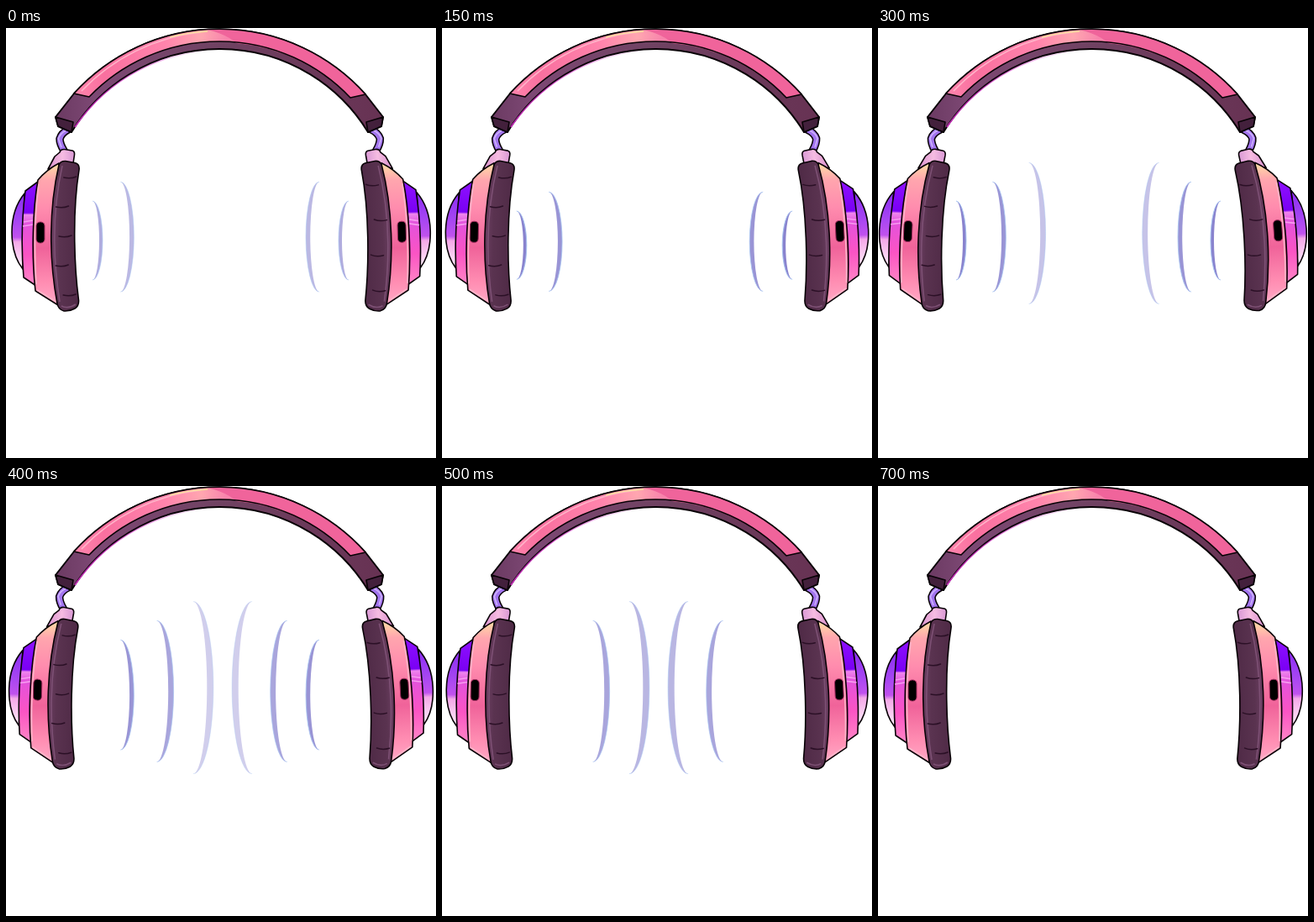
An HTML page that plays this animation: 512x512 px, repeating every 1.1 s.

```html
<!DOCTYPE html>
<html lang="en">
<head>
<meta charset="utf-8">
<title>Headphones</title>
<style>
  html, body { margin: 0; width: 100%; height: 100%; overflow: hidden; background: #fff; }
  svg { display: block; width: 100vw; height: 100vh; }
  .line { fill: none; stroke: #080206; stroke-width: 1.6; stroke-linejoin: round; stroke-linecap: round; }
  .shine { fill: none; stroke-width: 1.6; }
  .tick { fill: none; stroke: #2b1026; stroke-width: 1.5; stroke-linecap: round; }
</style>
</head>
<body>
<svg viewBox="0 0 512 512">
  <defs>
    <linearGradient id="band" gradientUnits="userSpaceOnUse" x1="81" y1="0" x2="262" y2="0">
      <stop offset="0" stop-color="#ff86ae"/><stop offset=".2" stop-color="#f9709f"/>
      <stop offset=".6" stop-color="#ff84ac"/><stop offset=".84" stop-color="#ffa6b0"/>
      <stop offset="1" stop-color="#f884ac"/>
    </linearGradient>
    <linearGradient id="under" gradientUnits="userSpaceOnUse" x1="59" y1="0" x2="449" y2="0">
      <stop offset="0" stop-color="#6b3a62"/><stop offset=".12" stop-color="#7d4874"/>
      <stop offset=".5" stop-color="#704262"/><stop offset="1" stop-color="#673253"/>
    </linearGradient>
    <linearGradient id="glow" gradientUnits="userSpaceOnUse" x1="80" y1="0" x2="240" y2="0">
      <stop offset="0" stop-color="#d22cc4"/><stop offset="1" stop-color="#d22cc4" stop-opacity="0"/>
    </linearGradient>
    <linearGradient id="shell" x1="0" y1="0" x2="0" y2="1">
      <stop offset="0" stop-color="#ffe0a4"/><stop offset=".12" stop-color="#ffa6ae"/>
      <stop offset=".32" stop-color="#ff8cae"/><stop offset=".6" stop-color="#f0639a"/>
      <stop offset=".84" stop-color="#ff8db2"/><stop offset="1" stop-color="#ffa9c6"/>
    </linearGradient>
    <linearGradient id="ring" gradientUnits="userSpaceOnUse" x1="0" y1="185" x2="0" y2="306">
      <stop offset="0" stop-color="#8d10ff"/><stop offset=".29" stop-color="#7a00f4"/>
      <stop offset=".31" stop-color="#ef86ee"/><stop offset=".4" stop-color="#e352dc"/>
      <stop offset=".7" stop-color="#fb54c4"/><stop offset="1" stop-color="#ff86c6"/>
    </linearGradient>
    <linearGradient id="disc" x1="0" y1="0" x2="0" y2="1">
      <stop offset="0" stop-color="#8a2cf2"/><stop offset=".35" stop-color="#a545f2"/>
      <stop offset=".58" stop-color="#c052ee"/><stop offset=".64" stop-color="#f4a8e8"/>
      <stop offset="1" stop-color="#fff0fa"/>
    </linearGradient>
    <linearGradient id="pad" x1="0" y1="0" x2="1" y2="0">
      <stop offset="0" stop-color="#6c3f62"/><stop offset=".3" stop-color="#5a3350"/>
      <stop offset="1" stop-color="#4f2a46"/>
    </linearGradient>
    <linearGradient id="stem" x1="0" y1="0" x2="1" y2="0">
      <stop offset="0" stop-color="#d890cc"/><stop offset=".55" stop-color="#f6bce2"/>
      <stop offset="1" stop-color="#d898d4"/>
    </linearGradient>

    <g id="cup">
      <path class="line" style="stroke-width:9.500" d="M74 121Q66 125 64 132Q64 138 69 146"/>
      <path class="line" style="stroke:#a274ee;stroke-width:6.400" d="M74 121Q66 125 64 132Q64 138 69 146"/>
      <path class="shine" stroke="#cdb2fb" d="M71 122Q64 126 62.500 132L66 142"/>
      <path class="line" style="fill:url(#stem)" d="M64 148Q65 144 70 144.500L79 146Q82 147 81.500 151L80 161L50 168L58 153Z"/>

      <path class="line" style="fill:url(#disc)" d="M22 197C13 208 7 224 7 243C7 262 12 277 20 287Z"/>
      <path class="line" style="fill:url(#ring)" d="M38 183L23 194C19 225 18 262 21 297L36 307Z"/>
      <path class="shine" stroke="#f79cf0" d="M21 231L32 229M20 236L32 234"/>
      <path class="line" style="fill:url(#shell)" d="M63 161Q48 169 38 181C32 215 30 268 35 313L62 330Z"/>
      <path class="shine" stroke="#ffb4c8" d="M39 186Q32 240 36 305M37 312L60 326"/>
      <rect x="36" y="231" width="10" height="25" rx="4.500" fill="#000" stroke="#a52e62"/>
      <path class="line" style="fill:url(#pad)" d="M63 163Q65 158 71 158.500L82 160.500Q88 162 87 169C79 218 81 282 86.500 324Q87 331 82 334Q76 337.500 69 337Q62 335 61 328C51 275 51 215 63 163Z"/>
      <path class="shine" stroke="#7d5074" d="M67 164C55 218 55 270 64 326M66 331Q74 335 83 329"/>
    </g>
  </defs>

  <g id="waves"></g>
  <g id="left"><use href="#cup"/></g>
  <g transform="translate(509 0) scale(-1 1)"><g id="right"><use href="#cup"/></g></g>

  <path id="frame" class="line" style="fill:url(#under);stroke-width:2" d="M59 106L81 78A233.600 233.600 0 0 1 428 79L449 106L447 117L431 124A206.800 206.800 0 0 0 78 124L62 117Z"/>
  <path class="shine" stroke="url(#glow)" d="M82 118A207.500 207.500 0 0 1 254 27"/>
  <path class="line" style="fill:#43203c" d="M59 106L80 112L78 124L62 117ZM449 106L429 112L431 124L447 117Z"/>
  <path fill="url(#band)" d="M81 78A233.600 233.600 0 0 1 428 79L410 83A215 215 0 0 0 99 82Z"/>
  <path fill="#f0649b" d="M238 1.500A233.600 233.600 0 0 1 428 79L410 83A215 215 0 0 0 274 18Q262 7 238 1.500Z"/>
  <path class="shine" stroke="#ffb3c8" d="M90 75A230 230 0 0 1 232 5"/>
  <path class="shine" stroke="#ffdf9c" d="M195 11A230 230 0 0 1 240 4"/>
  <path class="line" d="M81 78A233.600 233.600 0 0 1 428 79L410 83A215 215 0 0 0 99 82Z"/>
</svg>
<script>
  const LOOP = 1100, STEP = 50, REST = 700, PEAK = 300;
  const NS = "http://www.w3.org/2000/svg";
  const $ = id => document.getElementById(id);
  const clamp = v => Math.max(0, Math.min(1, v));

  function add(parent, attrs) {
    const el = document.createElementNS(NS, "path");
    for (const k in attrs) el.setAttribute(k, attrs[k]);
    return parent.appendChild(el);
  }

  // cushion creases alternate between the two edges
  function crease(side, y, gap) {
    for (let i = 0; y < 325; i++, y += gap) {
      const edge = 55 + ((y - 250) / 30) ** 2;
      add($(side), { class: "tick", d: `M${edge + (i % 2 ? 3 : 8)} ${y}q8 2 15 -1` });
    }
  }
  crease("left", 178, 35);
  crease("right", 187, 42);

  function makeArc() {
    return {
      body: add($("waves"), { fill: "#837dcc" }),
      rim: add($("waves"), { fill: "none", stroke: "#a9c6f2" })
    };
  }
  const waves = Array.from({ length: 4 }, () => [makeArc(), makeArc()]);

  function drawArc({ body, rim }, x, y, h, w, dir, alpha) {
    const s = dir > 0 ? 1 : 0, thick = 4 + (w - 12) * 0.3;
    const outer = `M${x} ${y - h}A${w} ${h} 0 0 ${s} ${x} ${y + h}`;
    body.setAttribute("d", `${outer}A${w - thick} ${h} 0 0 ${1 - s} ${x} ${y - h}Z`);
    rim.setAttribute("d", outer);
    for (const el of [body, rim]) el.setAttribute("opacity", alpha);
  }

  // Waves grow toward the middle; the first two are already out at the start.
  function drawWave(i, t) {
    const dip = t < 200 ? Math.sin(Math.PI * t / 200) : 0;
    const drift = i ? 0 : 10 * clamp(1 - t / PEAK);
    const born = i < 2 ? -100 : 100 * i;
    const fade = Math.min(clamp((t - born) / 150), clamp((400 + 100 * i - t) / 100));
    const alpha = (0.95 - 0.13 * i) * fade;
    const x = 93 + 43.3 * i - 13 * dip;
    const y = 253 - 4.3 * i + 8 * dip;
    const h = 47 + 18.5 * i - 9 * dip;
    const w = 12 + 4 * i;
    const span = 516 - 5 * (3 - i) ** 2 / 3;
    drawArc(waves[i][0], x + drift, y, h, w, 1, alpha);
    drawArc(waves[i][1], span - x, y, h, w, -1, alpha);
  }

  function draw(t) {
    const swing = t < PEAK ? t / PEAK : (1 - (t - PEAK) / (REST - PEAK)) ** 1.6;
    $("left").setAttribute("transform", `rotate(${2.45 * swing} 72 118)`);
    $("right").setAttribute("transform", `rotate(${2.25 * swing + 1.5} 72 118)`);
    waves.forEach((_, i) => drawWave(i, t));
  }

  const start = performance.now();
  function tick() {
    const t = (performance.now() - start) % LOOP;
    draw(Math.min(REST, Math.floor(t / STEP) * STEP));
    requestAnimationFrame(tick);
  }
  tick();
</script>
</body>
</html>
```
